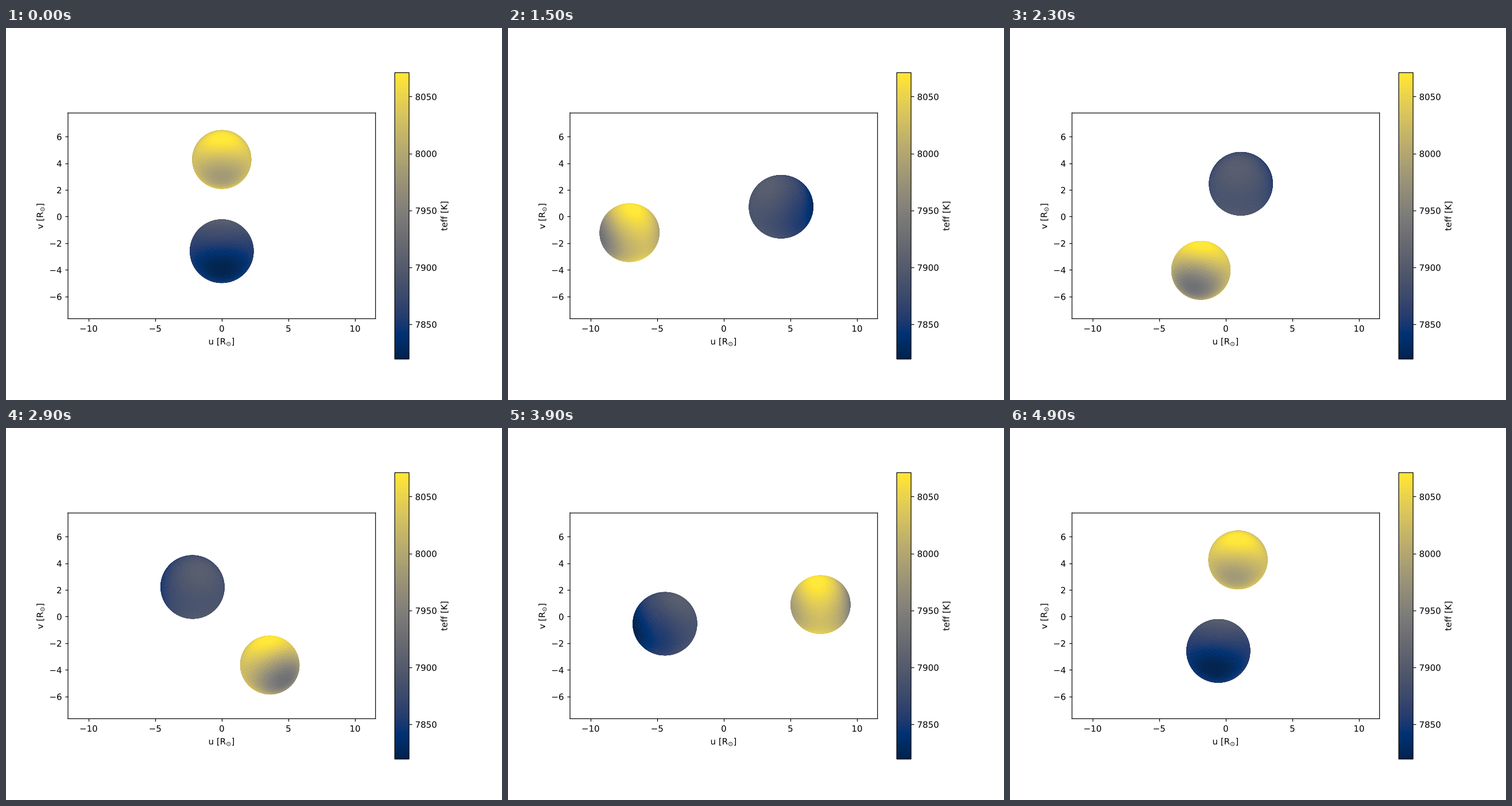
Write a matplotlib script that moves like this. It is 864 px wide and 648 px high and loops after 5 s.

```python
import numpy as np
import matplotlib.pyplot as plt
from matplotlib.animation import FuncAnimation
from matplotlib.cm import ScalarMappable
from matplotlib.collections import PolyCollection
from matplotlib.colors import Normalize
from matplotlib.patheffects import Normal
from matplotlib.text import Text
from matplotlib.tri import Triangulation

FRAMES = 50
INTERVAL = 100
INCLINATION = np.radians(55.2)
COS_I, SIN_I = np.cos(INCLINATION), np.sin(INCLINATION)
ECCENTRICITY = 0.012

plt.rcParams.update({"font.family": "DejaVu Sans", "font.size": 10})


def sphere_mesh(count):
    """Vertices and triangles of a sphere, triangulated stereographically."""
    k = np.arange(count) + 0.5
    z = 1 - 2 * k / count
    angle = k * np.pi * (3 - np.sqrt(5))
    ring = np.sqrt(1 - z**2)
    points = np.column_stack([ring * np.cos(angle), ring * np.sin(angle), z])
    flat = points[:, :2] / (1 + z)[:, None]
    return points, Triangulation(flat[:, 0], flat[:, 1]).triangles


POINTS, TRIANGLES = sphere_mesh(1100)
CENTROIDS = POINTS[TRIANGLES].mean(axis=1)
CENTROIDS /= np.linalg.norm(CENTROIDS, axis=1)[:, None]


def project(x, y, z):
    """Sky coordinates u, v and depth towards the viewer."""
    return x, y * COS_I + z * SIN_I, z * COS_I - y * SIN_I


class Star:
    """Tidally stretched star whose x axis points at its companion."""

    def __init__(self, ax, orbit, radii, side, pole, tide, heating):
        self.orbit = orbit
        self.shape = POINTS * radii
        x, _, z = CENTROIDS.T
        lit = np.clip((x + 0.25) / 1.25, 0, None) ** 1.5
        teff = side + pole * z**2 - tide * x**2 + heating * lit
        self.colors = cmap(norm(teff))
        self.mesh = PolyCollection([], linewidths=0.4)
        ax.add_collection(self.mesh, autolim=False)

    def update(self, px, py):
        dx, dy = -np.sign(self.orbit) * np.array([px, py]) / np.hypot(px, py)

        def turn(p):
            return p[:, 0] * dx - p[:, 1] * dy, p[:, 0] * dy + p[:, 1] * dx, p[:, 2]

        x, y, z = turn(self.shape)
        u, v, _ = project(x + self.orbit * px, y + self.orbit * py, z)
        depth = project(*turn(CENTROIDS))[2]
        order = np.argsort(depth)
        order = order[depth[order] > -0.12]
        self.mesh.set_verts(np.column_stack([u, v])[TRIANGLES[order]])
        self.mesh.set_facecolor(self.colors[order])
        self.mesh.set_edgecolor(self.colors[order])


def orbit_position(phase):
    """Unit Kepler orbit, starting at apastron behind the sky plane."""
    mean = 2 * np.pi * phase
    anomaly = mean
    for _ in range(6):
        anomaly = mean - ECCENTRICITY * np.sin(anomaly)
    return -np.sin(anomaly), np.cos(anomaly) + ECCENTRICITY


fig, ax = plt.subplots(figsize=(8, 6), dpi=108)
cmap = plt.get_cmap("cividis")
norm = Normalize(7819.4, 8071)

bar = fig.colorbar(ScalarMappable(norm, cmap), ax=ax, label="teff [K]")
bar.set_ticks(range(7850, 8051, 50))
ax.set_aspect("equal", adjustable="box")
ax.set(xlim=(-11.54, 11.54), ylim=(-7.67, 7.77),
       xticks=range(-10, 11, 5), yticks=range(-6, 7, 2),
       xlabel=r"u [$\mathrm{R_{\odot}}$]", ylabel=r"v [$\mathrm{R_{\odot}}$]")

# Keep frames and lettering at their sub-pixel positions.
for line in [*ax.spines.values(), bar.outline]:
    line.set_snap(False)
fig.canvas.draw()
for text in fig.findobj(Text):
    text.set_path_effects([Normal()])

stars = [
    Star(ax, 7.41, (2.237, 2.207, 2.177), side=8018, pole=51, tide=90, heating=55),
    Star(ax, -4.505, (2.408, 2.385, 2.361), side=7855, pole=33, tide=37, heating=71),
]


def draw(frame):
    position = orbit_position(frame / FRAMES)
    for star in stars:
        star.update(*position)
    return [star.mesh for star in stars]


animation = FuncAnimation(fig, draw, frames=FRAMES, interval=INTERVAL,
                          repeat=True, repeat_delay=0)
plt.show()
```
